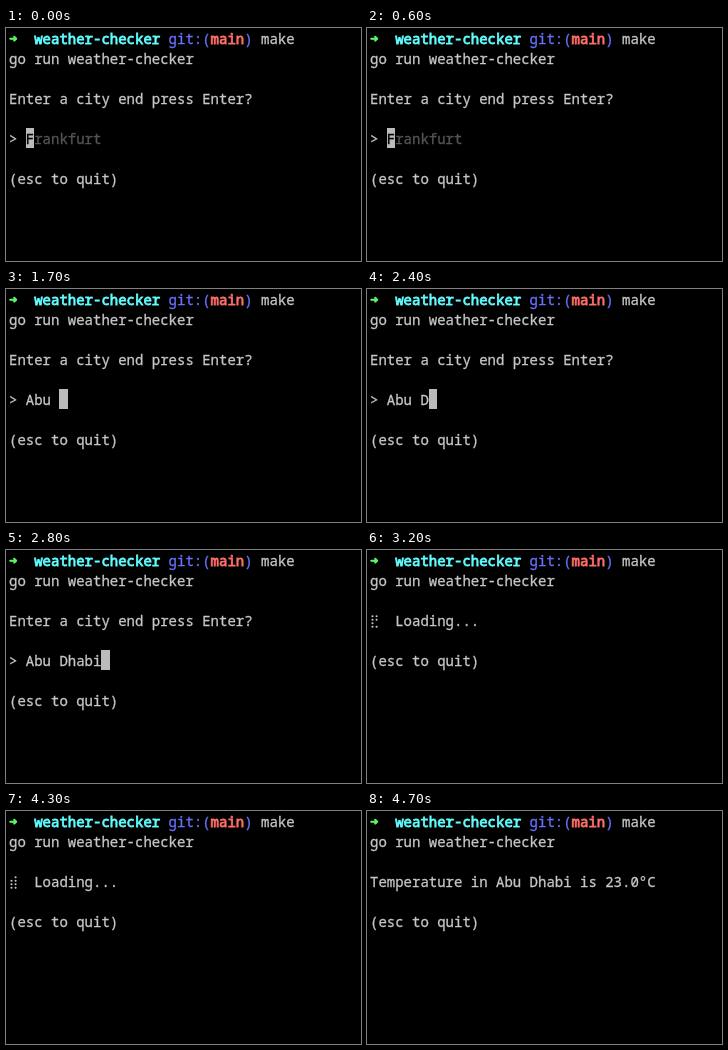
These frames come from a looping animation (355x233 px, 5.4 s). An HTML page:

```html
<!DOCTYPE html>
<html lang="en">
<head>
<meta charset="utf-8">
<title>weather-checker</title>
<style>
  html, body { margin: 0; width: 100%; height: 100%; overflow: hidden; background: #000; }
  #term {
    position: absolute; left: 0; top: 0; width: 355px; height: 233px; overflow: hidden;
    color: #c7c7c7; font: 14px/22px "Noto Sans Mono", "DejaVu Sans Mono", monospace;
    font-variant-ligatures: none; -webkit-text-stroke: .3px;
  }
  .row { position: absolute; left: 3px; height: 20px; white-space: pre; }
  b { font-weight: 400; -webkit-text-stroke: .8px; }
  .arrow {
    display: inline-block; position: relative; top: -2px; width: 8.4px;
    font: 10px/0 "DejaVu Sans", sans-serif; color: #5ffa68; -webkit-text-stroke: .8px;
  }
  .dir { color: #60fdff; }
  .git { color: #6871ff; }
  .branch { color: #ff6e67; }
  .hint { color: #555; }
  .cursor { display: inline-block; height: 20px; vertical-align: top; }
  .cursor.on { background: #bbb; color: #000; }
  #spinner { position: absolute; left: 3px; top: 61px; fill: #c7c7c7; }
</style>
</head>
<body>
<div id="term">
  <div class="row" style="top:0"><span class="arrow">➜</span>  <b class="dir">weather-checker</b> <span class="git">git:(</span><b class="branch">main</b><span class="git">)</span> make</div>
  <div class="row" style="top:20px">go run weather-checker</div>
  <div class="row" style="top:60px" id="status"></div>
  <div class="row" style="top:100px" id="prompt">&gt; <span id="typed"></span><span id="cursor" class="cursor on"> </span><span id="hint" class="hint">rankfurt</span></div>
  <div class="row" style="top:140px" id="quit">(esc to quit)</div>
  <svg id="spinner" width="9" height="20"></svg>
</div>
<script>
const LOOP = 5400, LOADING = 3200, DONE = 4400;
const BLINK_OFF = [100, 600];
const CITY = "Abu Dhabi";
const KEYS = [1000, 1300, 1400, 1700, 2000, 2500, 2600, 2700, 2800];
const FIRST_GAP = 5;
const $ = id => document.getElementById(id);

// Braille dots, listed down the left column and up the right one
const dots = Array.from({ length: 8 }, (_, i) => {
  const dot = document.createElementNS("http://www.w3.org/2000/svg", "circle");
  dot.setAttribute("cx", i < 4 ? 2.5 : 6.6);
  dot.setAttribute("cy", 5.3 + 3.5 * (i < 4 ? i : 7 - i));
  dot.setAttribute("r", 1.05);
  $("spinner").append(dot);
  return dot;
});

function setText(id, text) {
  if ($(id).textContent !== text) $(id).textContent = text;
}

function drawInput(t) {
  const count = KEYS.filter(k => k <= t).length;
  const empty = count === 0;
  const lit = t < BLINK_OFF[0] || t >= BLINK_OFF[1];
  setText("typed", CITY.slice(0, count));
  setText("cursor", empty ? "F" : " ");
  $("cursor").className = "cursor " + (lit ? "on" : "hint");
  $("hint").hidden = !empty;
}

function drawSpinner(t) {
  const gap = (FIRST_GAP + Math.floor((t - LOADING) / 100)) % 8;
  dots.forEach((dot, i) => dot.setAttribute("opacity", i === gap ? 0 : 1));
}

function draw(t) {
  const asking = t < LOADING;
  const loading = !asking && t < DONE;
  setText("status", asking ? "Enter a city end press Enter?"
    : loading ? "   Loading..."
    : `Temperature in ${CITY} is 23.0°C`);
  $("prompt").style.display = asking ? "" : "none";
  $("quit").style.top = asking ? "140px" : "100px";
  $("spinner").style.display = loading ? "" : "none";
  if (asking) drawInput(t);
  if (loading) drawSpinner(t);
}

const start = performance.now();
function tick() {
  draw((performance.now() - start) % LOOP);
  requestAnimationFrame(tick);
}
tick();
</script>
</body>
</html>
```
